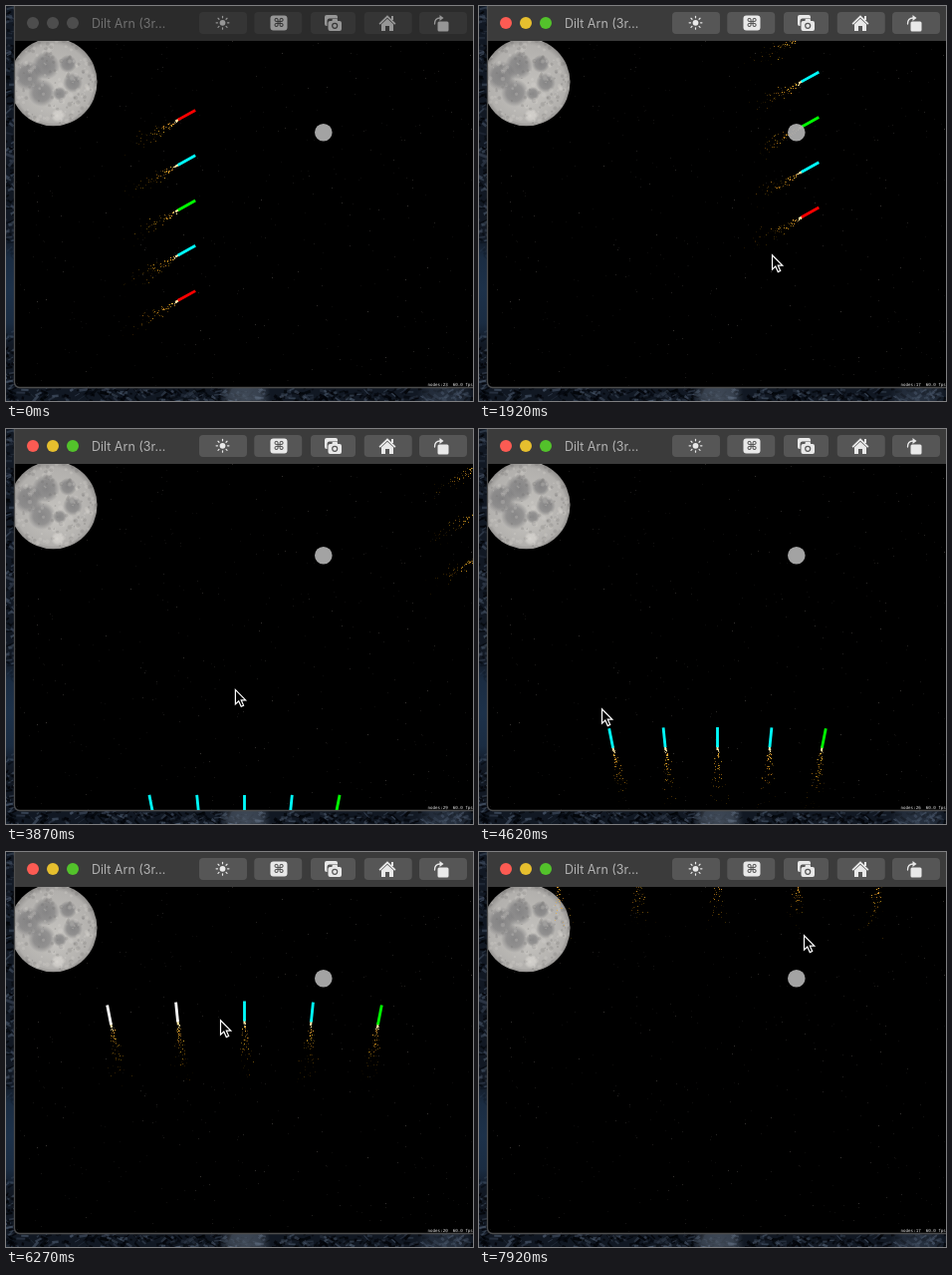
An HTML page with a canvas for the animation above (8000 ms loop, 469 px wide and 396 px high).

```html
<!DOCTYPE html>
<html lang="en">
<head>
<meta charset="utf-8">
<title>Fireworks</title>
<style>
html, body { margin: 0; width: 100%; height: 100%; overflow: hidden; background: #000; }
canvas { display: block; }
</style>
</head>
<body>
<canvas id="stage" width="469" height="396"></canvas>
<script>
const W = 469, H = 396, LOOP = 8000, ACTIVE_AT = 750;
const TAU = Math.PI * 2;
const ctx = document.getElementById('stage').getContext('2d');

const rnd = n => { const v = Math.sin(n * 127.1 + 3.7) * 43758.5453; return v - Math.floor(v); };

// Endless generator of seeded random numbers in [lo, hi)
function random(seed) {
  let n = seed;
  return (lo, hi) => lo + rnd(n++) * (hi - lo);
}

function disc(c, x, y, r, fill) {
  c.fillStyle = fill;
  c.beginPath();
  c.arc(x, y, r, 0, TAU);
  c.fill();
}

function box(c, x, y, w, h, r, fill) {
  c.fillStyle = fill;
  c.beginPath();
  c.roundRect(x, y, w, h, r);
  c.fill();
}

function blob(c, x, y, r, rgb, alpha) {
  const g = c.createRadialGradient(x, y, 0, x, y, r);
  g.addColorStop(0, `rgba(${rgb},${alpha})`);
  g.addColorStop(0.6, `rgba(${rgb},${alpha * 0.8})`);
  g.addColorStop(1, `rgba(${rgb},0)`);
  disc(c, x, y, r, g);
}

function poly(c, pts, fill) {
  c.fillStyle = fill;
  c.beginPath();
  pts.forEach(([x, y]) => c.lineTo(x, y));
  c.closePath();
  c.fill();
}

function line(c, x1, y1, x2, y2, color, width) {
  c.strokeStyle = color;
  c.lineWidth = width;
  c.beginPath();
  c.moveTo(x1, y1);
  c.lineTo(x2, y2);
  c.stroke();
}

// Dark rock: tilted light and dark chips inside a rectangle
function rocks(c, x, y, w, h, count, seed) {
  const r = random(seed);
  for (let i = 0; i < count; i++) {
    c.save();
    c.translate(x + r(0, w), y + r(0, h));
    c.rotate(r(-0.9, 0.9));
    c.fillStyle = r(0, 1) < 0.6 ? `rgba(2,4,8,${r(0.4, 0.9)})` : `rgba(92,108,130,${r(0.15, 0.5)})`;
    c.fillRect(0, 0, r(2, 9), r(1, 3));
    c.restore();
  }
}

function drawDesktop(c) {
  c.fillStyle = '#111823';
  c.fillRect(0, 0, W, H);
  rocks(c, -4, 0, 12, 250, 150, 100);
  rocks(c, -4, 325, 12, 70, 40, 1100);
  rocks(c, 0, 383, W, 13, 380, 1600);
  blob(c, 4, 285, 55, '32,56,84', 0.8);
  blob(c, 240, 392, 26, '96,108,124', 0.6);
  blob(c, 440, 394, 28, '70,84,104', 0.4);
}

function drawMoon(c) {
  c.save();
  c.beginPath();
  c.arc(47.5, 76.3, 44, 0, TAU);
  c.clip();
  const g = c.createRadialGradient(50, 88, 5, 47.5, 76.3, 45);
  g.addColorStop(0, '#c4c2be');
  g.addColorStop(0.85, '#b2b0ad');
  g.addColorStop(1, '#8a8886');
  c.fillStyle = g;
  c.fillRect(0, 30, 95, 92);
  [[22, 70, 15], [36, 87, 14], [67, 77, 10], [40, 60, 14], [62, 58, 9], [54, 88, 7]]
    .forEach(([x, y, r]) => blob(c, x, y, r, '100,100,103', 0.62));
  const r = random(40);
  for (let i = 0; i < 240; i++) {
    blob(c, r(3, 92), r(32, 121), r(1, 3), r(0, 1) < 0.55 ? '222,219,214' : '105,103,102', 0.25);
  }
  blob(c, 52, 110, 7, '230,227,222', 0.6);
  c.restore();
}

function clipSky(c) {
  c.beginPath();
  c.roundRect(9, 35, W, 347, [0, 0, 0, 5]);
  c.clip();
}

function drawSky(c) {
  c.save();
  clipSky(c);
  c.fillStyle = '#000';
  c.fillRect(9, 35, W, 347);
  const r = random(5000);
  for (let i = 0; i < 450; i++) {
    const v = 12 + r(0, 1) ** 5 * 45;
    c.fillStyle = `rgb(${v},${v * 0.95},${v * 0.9})`;
    c.fillRect(Math.floor(r(9, W)), Math.floor(r(35, 382)), 1, 1);
  }
  drawMoon(c);
  c.restore();
}

function drawIcons(c, ink, back) {
  disc(c, 217.5, 16.8, 2.9, ink);
  c.lineCap = 'round';
  for (let a = 0; a < TAU - 0.1; a += TAU / 8) {
    const x = Math.cos(a), y = Math.sin(a);
    line(c, 217.5 + x * 5, 16.8 + y * 5, 217.5 + x * 6.4, 16.8 + y * 6.4, ink, 1.2);
  }

  box(c, 265.5, 9.5, 17, 15, 3, ink);
  c.fillStyle = back;
  c.font = 'bold 12px "DejaVu Sans", sans-serif';
  c.textAlign = 'center';
  c.fillText('⌘', 274, 21.4);
  c.textAlign = 'left';

  box(c, 320, 9, 13, 11, 2, ink);
  box(c, 322.5, 12.5, 15.5, 13, 2.5, back);
  box(c, 323.5, 15, 13.5, 10, 2, ink);
  box(c, 327.5, 13, 5.5, 4, 1, ink);
  disc(c, 330.2, 19.8, 3.1, back);
  disc(c, 330.2, 19.8, 1.9, ink);

  poly(c, [[374.5, 17.5], [383, 9.2], [391.5, 17.5], [390.3, 18.7], [383, 11.8], [375.7, 18.7]], ink);
  poly(c, [[377, 18.3], [383, 12.8], [389, 18.3], [389, 25], [377, 25]], ink);
  box(c, 381, 20, 4, 5, 0, back);
  box(c, 387, 10, 2, 4, 0, ink);

  box(c, 433.5, 15.5, 11, 10, 1.5, ink);
  c.lineWidth = 1.3;
  c.beginPath();
  c.moveTo(430.5, 18);
  c.quadraticCurveTo(430.5, 12, 436, 12);
  c.stroke();
  poly(c, [[435.5, 9], [439.5, 12], [435.5, 15]], ink);
}

const ACTIVE = { bar: '#3b3b3b', button: '#565656', text: '#b2b2b2', ink: '#e9e9e9', lights: ['#fc5b53', '#e6bf2e', '#53c22b'] };
const IDLE = { bar: '#2b2b2b', button: '#353535', text: '#707070', ink: '#969696', lights: Array(3).fill('#4d4d4d') };

function drawTitleBar(c, look) {
  c.fillStyle = look.bar;
  c.fillRect(8, 0, W, 35);
  look.lights.forEach((fill, i) => disc(c, 27 + i * 20, 17, 6, fill));
  c.fillStyle = look.text;
  c.font = '12.5px Inter, sans-serif';
  c.fillText('Dilt Arn (3r…', 86, 21.8);
  for (let i = 0; i < 5; i++) {
    const w = i === 2 ? 45 : 48;
    box(c, 218 + i * 55.25 - w / 2, 6, w, 22, 4, look.button);
  }
  drawIcons(c, look.ink, look.button);
}

function windowLayer(look) {
  const cv = document.createElement('canvas');
  cv.width = W;
  cv.height = H;
  const c = cv.getContext('2d');
  drawDesktop(c);
  drawSky(c);
  drawTitleBar(c, look);
  c.strokeStyle = '#4c4c4c';
  c.beginPath();
  c.roundRect(8.5, -10, W, 392.5, 5);
  c.stroke();
  return cv;
}
const activeWindow = windowLayer(ACTIVE), idleWindow = windowLayer(IDLE);

const RED = '#ff0000', CYAN = '#00ffff', GREEN = '#00ff00', WHITE = '#ffffff';

// Five parallel rockets crossing to the upper right
const crossing = [RED, CYAN, GREEN, CYAN, RED].map((color, k) => ({
  color,
  dir: [0.875, -0.484],
  tip(t) {
    const s = 0.0787 * t - 0.8;
    return [191 + s, 104 + 45.3 * k - 0.553 * s];
  }
}));

// Five rockets rising in a fan
const rising = [CYAN, CYAN, CYAN, CYAN, GREEN].map((color, k) => {
  const j = k - 2, a = Math.atan(j * 0.099);
  return {
    color,
    pickable: color === CYAN,
    dir: [Math.sin(a), -Math.cos(a)],
    tip(t) {
      const d = t - 4620;
      return [239.5 + j * (54.4 + 0.0088 * d), 299 - 0.0906 * d + j * j * (0.3 + 0.00043 * d)];
    }
  };
});
const rockets = [...crossing, ...rising];

function drawSparks({ tip, dir: [ux, uy] }, id, t) {
  const gap = 6;
  for (let i = Math.floor((t - 620) / gap); i * gap <= t; i++) {
    const born = i * gap, age = t - born, r = random((i + id * 917) * 7.3);
    const fade = 1 - age / r(220, 620);
    if (fade <= 0) continue;
    const [x, y] = tip(born);
    const back = 21 + age * r(0, 0.03);
    const side = (r(-1, 1) + r(-1, 1)) * (0.6 + age * 0.014);
    ctx.globalAlpha = Math.min(1, fade * r(0.2, 1.3));
    ctx.fillStyle = age < 40 ? '#ffe6a0' : `hsl(${r(34, 44)},95%,${48 + fade * 14}%)`;
    ctx.fillRect(Math.round(x - ux * back - uy * side), Math.round(y - uy * back + ux * side), 1, 1);
  }
  ctx.globalAlpha = 1;
}

function drawRocket(rocket, id, t) {
  const [x, y] = rocket.tip(t), [ux, uy] = rocket.dir;
  if (x > 540 || y > 420 || y < -90) return;
  drawSparks(rocket, id, t);
  const picked = rocket.pickable && t > 4800 && pointerAt(t)[0] > x;
  line(ctx, x - ux * 18, y - uy * 18, x - ux * 23, y - uy * 23, '#ffeaa8', 2);
  line(ctx, x, y, x - ux * 20, y - uy * 20, picked ? WHITE : rocket.color, 2.8);
}

// [time, x, y]
const POINTER = [[300, 440, 398], [750, 294, 249], [3420, 294, 249], [4620, 123, 280],
  [5070, 112, 262], [6270, 215, 168], [7920, 326, 83]];

function pointerAt(t) {
  const i = Math.max(1, POINTER.findIndex(p => p[0] >= t));
  const [t0, x0, y0] = POINTER[i - 1], [t1, x1, y1] = POINTER[i];
  const p = (t - t0) / (t1 - t0);
  return [x0 + (x1 - x0) * p, y0 + (y1 - y0) * p];
}

function drawPointer(t) {
  const [x, y] = pointerAt(t);
  ctx.save();
  ctx.translate(x, y);
  poly(ctx, [[0.5, 0.8], [0.5, 15.2], [3.8, 12.1], [6.3, 17.6], [8.7, 16.5], [6.3, 11.2], [10.8, 11.2]], '#000');
  ctx.strokeStyle = '#fff';
  ctx.lineWidth = 1.2;
  ctx.stroke();
  ctx.restore();
}

// A launch every 5400 ms adds nodes, which then drop off in threes
function stats(t) {
  const age = (t + 1700) % 5400;
  const nodes = 29 - 3 * Math.min(4, Math.floor(age / 850));
  const fps = t > 2800 && t < 3400 ? '59.1' : '60.0';
  return `nodes:${nodes}  ${fps} fps`;
}

function draw(t) {
  ctx.drawImage(t >= ACTIVE_AT ? activeWindow : idleWindow, 0, 0);
  ctx.save();
  clipSky(ctx);
  rockets.forEach((rocket, id) => drawRocket(rocket, id, t));
  disc(ctx, 318.8, 126.7, 8.8, 'rgba(172,172,172,.95)');
  ctx.fillStyle = '#e2e2e2';
  ctx.font = '4.2px "DejaVu Sans Mono", monospace';
  ctx.fillText(stats(t), 423.5, 380.5);
  ctx.restore();
  if (t >= 300) drawPointer(t);
}

// The picture advances in held steps of about 150 ms
function held(t) {
  if (t < 1180) return Math.floor(t / 150) * 150;
  return t < 1320 ? 1180 : 1320 + Math.floor((t - 1320) / 150) * 150;
}

const start = performance.now();
function tick() {
  draw(held((performance.now() - start) % LOOP));
  requestAnimationFrame(tick);
}
tick();
</script>
</body>
</html>
```
